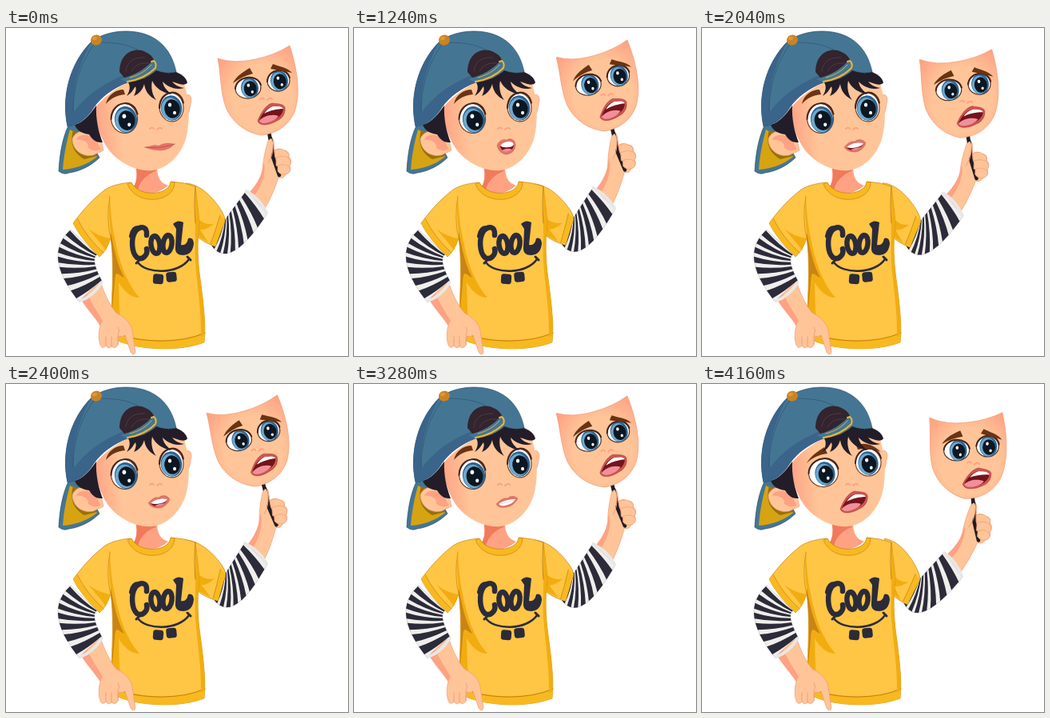
An HTML page that plays this animation: 428 by 410 pixels, repeating every 5.04 s.

```html
<!DOCTYPE html>
<html lang="en">
<head>
<meta charset="utf-8">
<title>Boy with a mask</title>
<style>
html, body { margin: 0; width: 100%; height: 100%; overflow: hidden; background: #fff; }
svg { display: block; width: 100%; height: 100%; }
</style>
</head>
<body>
<svg id="stage" viewBox="0 0 428 410"></svg>
<script>
const C = {
  skin: '#ffc598', shade: '#fea283', deep: '#f07a5c', skinLine: '#f19a78',
  cap: '#447694', capDark: '#3a648a', capLine: '#2c5068', trim: '#f2b62c',
  hair: '#231d29', brow: '#6a3413', ink: '#2b2b39',
  shirt: '#ffc544', fold: '#f1ad10', seam: '#c98414', hem: '#f8b91f',
  lip: '#e27468', lipDark: '#c2504b', throat: '#75131b', tongue: '#f0909a'
};

const fill = (d, color, extra = '') => `<path d="${d}" fill="${color}" ${extra}/>`;
const line = (d, color, w = 1) =>
  `<path d="${d}" fill="none" stroke="${color}" stroke-width="${w}" stroke-linecap="round" stroke-linejoin="round"/>`;
const shape = (d, color, edge, w = 0.7) => fill(d, color, `stroke="${edge}" stroke-width="${w}" stroke-linejoin="round"`);
const oval = (x, y, rx, ry, color, rot = 0, extra = '') =>
  `<ellipse cx="${x}" cy="${y}" rx="${rx}" ry="${ry}" fill="${color}" transform="rotate(${rot} ${x} ${y})" ${extra}/>`;
const group = (id, body) => `<g id="${id}">${body}</g>`;
const stop = (at, color) => `<stop offset="${at}" stop-color="${color}"/>`;

const defs = '<defs>' +
  `<radialGradient id="glow" cx="0.55" cy="0.58" r="0.66">${stop(0.55, C.skin)}${stop(1, C.shade)}</radialGradient>` +
  `<linearGradient id="cheek" x1="0" y1="0.55" x2="1" y2="0.45">${stop(0, C.shade)}${stop(0.28, C.skin)}</linearGradient></defs>`;

// Point on a quadratic curve given as [x0, y0, cx, cy, x1, y1]
const onQuad = (q, t) => [0, 1].map(i =>
  (1 - t) ** 2 * q[i] + 2 * t * (1 - t) * q[i + 2] + t * t * q[i + 4]);

// Striped sleeve between an outer and an inner curve; stripes sag by (sx, sy)
function sleeve(outer, inner, count, sx, sy) {
  const [a, b, c, d, e, f] = inner;
  let out = shape(`M${outer[0]},${outer[1]} Q${outer.slice(2)} L${e},${f} Q${c},${d} ${a},${b}Z`, '#f0eeec', '#c9c8cb');
  const sag = (u, v) => [(u[0] + v[0]) / 2 + sx, (u[1] + v[1]) / 2 + sy];
  for (let i = 0; i < count; i++) {
    const t0 = (i + 0.1) / count, t1 = (i + 0.7) / count;
    const [p, q, r, s] = [onQuad(outer, t0), onQuad(inner, t0), onQuad(inner, t1), onQuad(outer, t1)];
    out += fill(`M${p} Q${sag(p, q)} ${q} L${r} Q${sag(r, s)} ${s}Z`, C.ink);
  }
  return out;
}

function eye(x, y, rx, ry, iris, dx, dy, edge = '#7b4322') {
  const s = iris / 14;
  return oval(x, y, rx, ry, '#fff', -8, `stroke="${edge}" stroke-width="1.2"`) +
    oval(x + dx, y + dy, iris * 0.95, iris * 1.12, '#2c6390', -8) +
    oval(x + dx - s, y + dy + s, iris * 0.82, iris, '#6ba9d0', -8) +
    oval(x + dx + s, y + dy + s, iris * 0.7, iris * 0.84, '#0d1722', -8) +
    oval(x + dx - 2 * s, y + dy - 4 * s, 2.2 * s, 2.6 * s, '#fff') +
    oval(x + dx + 4 * s, y + dy + 6 * s, 2 * s, 2.2 * s, '#fff') +
    line(`M${x - rx},${y + 1} C${x - rx * 0.95},${y - ry * 1.15} ${x + rx * 0.7},${y - ry * 1.45} ${x + rx},${y - ry * 0.3}`, '#45241a', 2);
}

const scream = (x, y) => `<g transform="translate(${x} ${y})">` +
  shape('M-17,9 C-13,-1 -7,-11 1,-13 C5,-12 15,-13 17,-8 C18,0 14,6 7,9 C-3,15 -15,16 -17,9Z', '#cf5552', '#a83638', 0.6) +
  fill('M-15,8 C-11,-1 -5,-8 2,-9 C8,-9 13,-10 15,-6 C15,0 9,6 3,8 C-5,12 -13,12 -15,8Z', C.throat) +
  fill('M-9,0 C-5,-6 -1,-8 2,-9 C8,-9 13,-10 15,-6 C8,-6 -2,-4 -9,0Z', '#fff') +
  fill('M-15,9 C-10,3 1,0 9,3 C6,9 -12,16 -15,9Z', C.tongue) + '</g>';

const nose = (x, y) => line(`M${x - 7},${y + 1} Q${x - 4},${y - 2} ${x - 2},${y + 1} M${x + 2},${y + 2} Q${x + 6},${y - 2} ${x + 8},${y + 1}`, C.shade, 2);

const mask = shape('M265,38 Q286,45 312,39 Q336,34 355,22 C363,46 370,80 361,105 C353,123 338,132 320,134 C300,131 283,118 275,99 C268,79 269,57 265,38Z', 'url(#glow)', C.skinLine) +
  eye(303, 75, 16, 13, 11.5, 2, 0, '#54302a') + eye(341, 66, 14, 13, 11.5, 1, 0, '#54302a') +
  fill('M284,69 C288,60 298,54 305,50 L309,57 C300,59 292,63 284,69Z', C.brow) +
  fill('M331,51 L334,45 C341,48 352,49 358,56 C350,54 340,53 331,51Z', C.brow) +
  nose(325, 88) + scream(332, 107);

const fist = shape('M336,153 Q344,149 350,154 Q356,157 353,162 Q347,166 337,162Z', C.skin, C.skinLine) +
  shape('M338,162 Q350,158 355,164 Q358,169 354,173 Q345,176 338,172Z', C.skin, C.skinLine) +
  shape('M340,172 Q350,169 355,174 Q357,181 350,183 Q343,184 340,179Z', C.skin, C.skinLine);

const hand = shape('M303,208 C312,198 319,188 321,177 C322,163 325,151 328,141 Q332,133 335,141 L336,153 Q342,149 347,153 Q355,153 354,161 Q359,166 355,172 Q358,180 350,183 Q347,189 341,187 C337,199 331,214 323,227Z', C.skin, C.skinLine) +
  fill('M303,208 C312,198 319,188 321,177 L323,168 C326,181 320,199 308,213Z', C.shade) +
  line('M331,138 L334,161 L342,184', '#211d22', 4.6) + fist +
  fill('M325,157 C326,149 328,138 332,138 Q335,142 334,151 Q333,159 327,169Z', C.skin) +
  line('M334,145 Q335,159 328,169', C.skinLine, 0.9);

const arm = line('M329,130 L332,146', '#211d22', 4.6) + mask + hand +
  sleeve([256, 270, 278, 307, 327, 232], [273, 241, 275, 238, 301, 203], 7, 3, 1) +
  line('M301,204 Q318,214 326,231', '#e9e7e5', 4) +
  shape('M225,194 C243,195 260,212 270,229 Q274,235 274,241 Q268,257 262,273 Q248,269 236,258Z', C.shirt, C.seam) +
  fill('M274,240 Q268,257 262,273 L255,271 Q262,253 268,234Z', C.hem) +
  line('M268,234 Q262,254 256,270', C.seam, 0.7) +
  fill('M238,236 Q247,247 260,245 Q250,253 243,252 L253,268 L236,258Z', C.fold);

const brim = shape('M78,122 C70,139 67,160 66,179 Q72,184 79,181 C94,179 108,171 117,162 L108,146 L91,121Z', C.cap, C.capLine) +
  fill('M80,127 C75,145 72,162 71,177 C89,176 102,170 114,161 L105,140Z', '#d6a313') +
  fill('M84,127 C79,147 86,157 98,164 L114,160 L107,143Z', '#977108');

const ears = shape('M117,132 C104,124 86,128 83,139 C83,151 94,162 109,159 L122,153Z', C.skin, C.skinLine) +
  fill('M112,139 C101,131 90,133 88,140 C98,139 104,144 103,150 Q109,155 119,152Z', C.shade) +
  shape('M222,86 C229,80 234,85 231,95 C230,105 226,113 222,112Z', C.skin, C.skinLine);

const face = fill('M111,100 C126,82 146,70 165,62 L221,64 C230,88 231,117 225,139 C218,160 202,176 183,178 C160,180 137,165 127,150 C118,137 111,115 111,100Z', 'url(#cheek)');

const hat = fill('M86,121 C97,118 105,108 113,97 C112,113 116,131 121,143 C112,144 107,138 104,133 C96,132 89,129 86,121Z', C.hair) +
  shape('M77,123 C69,85 80,44 107,17 C124,4 151,1 172,7 C195,14 208,31 213,55 Q200,58 188,53 C178,61 165,66 152,68 C134,75 119,86 110,99 C102,112 92,121 77,123Z', C.cap, C.capLine) +
  fill('M77,123 C69,85 80,44 107,17 C90,48 82,78 85,105 C105,78 130,66 150,58 L152,68 C134,75 119,86 110,99 C102,112 92,121 77,123Z', C.capDark) +
  line('M112,18 C94,41 84,72 84,104 M114,18 C136,18 153,20 166,28', C.capLine, 0.6) +
  oval(113, 15, 7, 6.5, '#cb8322', -20) + oval(111, 13, 3, 2, '#dc9a3c', -20) +
  fill('M142,55 C142,34 156,25 170,28 C182,32 188,40 184,46 C175,56 160,60 148,62Z', '#33242e') +
  line('M150,54 C151,42 160,36 174,37 M157,54 C161,46 169,43 179,44', '#503845', 1);

const bangs = fill('M153,68 C168,66 180,60 188,53 Q200,58 213,55 Q225,60 227,68 Q225,72 217,70 L208,67 C212,72 217,74 223,75 C211,78 202,73 196,67 C197,75 203,79 207,83 C196,81 187,75 183,66 C181,74 183,84 188,90 C178,85 174,78 173,70 C171,77 167,82 160,85 C163,79 163,76 162,73 C158,79 156,82 151,85 C155,79 156,73 153,68Z', C.hair) +
  fill('M143,64 C161,59 175,51 183,41 L187,42 L187,51 C177,60 165,66 152,68Z', C.cap) +
  line('M152,67 C165,65 178,59 187,50 Q189,44 185,41 L182,42', C.trim, 2) +
  line('M155,62 C167,59 176,53 182,46', C.trim, 0.9);

const calmEyes = eye(148, 113, 16.5, 18.5, 14.8, 2, 1.5) + eye(207, 99, 15, 18, 14, 0, 1) +
  fill('M125,95 C127,84 137,77 147,77 L149,83 C139,84 132,87 125,95Z', C.brow);

const scaredEyes = eye(152, 111, 18.5, 17.5, 13.2, 2, 1) + eye(208, 98, 16, 17, 13.2, 0, 1) +
  fill('M131,99 C136,90 145,84 153,79 L157,87 C147,88 138,92 131,99Z', C.brow) +
  fill('M193,77 C203,72 215,76 224,85 C214,80 205,80 195,82Z', C.brow) +
  scream(190, 147);

const mouths = {
  closed: fill('M174,149 C182,147 186,145 191,147 C198,143 204,143 211,145 C206,151 198,154 191,153 C184,153 178,151 174,149Z', C.lip) +
    line('M174,149 C186,150 197,150 211,145', C.lipDark, 0.9),
  teeth: shape('M178,150 C184,144 188,142 192,143 C197,139 201,140 205,143 C202,149 197,153 190,154 C185,155 180,154 178,150Z', C.lip, C.lipDark, 0.4) +
    fill('M181,150 C186,146 194,144 202,144 C199,149 194,151 189,152 Q183,153 181,150Z', '#fff') +
    line('M182,150 Q193,149 201,145', '#d9c8c8', 0.6),
  round: shape('M179,147 C181,141 187,138 191,140 C197,136 202,141 202,146 C202,153 197,158 190,158 C184,157 180,152 179,147Z', C.lip, C.lipDark, 0.4) +
    fill('M183,147 C186,142 197,139 200,145 C200,151 196,155 190,155 C186,154 183,151 183,147Z', C.throat) +
    fill('M183,147 C186,142 197,139 200,145 Q199,149 193,149 Q186,150 183,147Z', '#fff') +
    fill('M185,153 Q192,149 198,152 Q195,155 190,155 Q187,155 185,153Z', C.tongue),
  open: shape('M178,149 C183,143 187,141 191,142 C196,138 202,139 205,144 C203,150 197,155 191,155 C185,155 181,153 178,149Z', C.lip, C.lipDark, 0.4) +
    fill('M181,149 C186,144 196,142 202,144 C200,149 195,152 190,153 C185,153 182,151 181,149Z', C.throat) +
    fill('M181,149 C186,144 196,142 202,144 Q200,148 194,149 Q187,151 181,149Z', '#fff') +
    fill('M186,152 Q193,149 199,149 Q194,153 189,153Z', C.tongue)
};

const leftSleeve = sleeve([81, 252, 44, 284, 92, 343], [114, 283, 105, 289, 121, 318], 7, -1, 3);

const leftHand = shape('M94,339 C102,352 112,362 118,372 C115,382 116,393 119,398 Q122,401 125,397 Q128,402 132,398 Q137,402 140,396 L141,385 Q146,387 149,384 L156,405 Q160,411 162,405 L158,379 C156,367 147,361 138,356 C129,346 123,331 118,317Z', C.skin, C.skinLine) +
  fill('M94,339 C102,352 112,362 118,372 L121,366 C115,355 107,345 102,332Z', C.shade) +
  line('M125,397 L125,386 M132,398 L132,386 M140,396 L140,383 Q143,378 140,374', C.skinLine, 0.9) +
  line('M93,341 Q109,335 119,319', '#e9e7e5', 4);

const neck = fill('M162,168 C164,180 164,190 160,198 Q180,216 203,197 C192,193 189,186 189,172Z', C.shade) +
  fill('M162,172 C165,184 164,192 160,198 L165,202 C168,191 176,183 187,179 L189,174Z', C.deep);

const shirt = shape('M156,193 C146,194 133,196 124,202 C108,214 95,229 84,244 Q94,264 117,286 Q126,278 131,263 C135,286 133,330 132,350 L131,384 C140,398 205,409 248,393 C251,368 245,330 242,306 C239,281 240,260 242,242 L237,198 Q224,193 207,192 C206,207 172,216 156,193Z', C.shirt, C.seam) +
  fill('M130,210 C127,244 133,262 134,282 C136,310 131,336 131,384 Q137,391 147,394 C141,365 142,340 141,318 C148,330 157,337 167,337 C150,318 141,290 136,262 C132,245 131,228 130,210Z', C.fold) +
  fill('M131,255 C135,275 139,296 148,312 C140,309 137,300 136,318 L132,362 C134,320 135,290 131,263Z', C.seam) +
  fill('M84,244 Q94,264 117,286 L122,281 Q101,262 89,238Z', C.hem) +
  line('M89,238 Q101,262 122,281 M130,210 Q125,239 131,263', C.seam, 0.7) +
  fill('M131,384 C140,398 205,409 248,393 L249,381 C215,396 155,394 131,376Z', C.hem) +
  line('M131,376 C155,394 215,396 249,381', C.seam, 1.2) +
  fill('M131,263 Q116,261 103,251 Q118,268 125,278Z', C.fold) +
  fill('M237,198 L242,242 C240,260 239,281 242,306 C245,330 251,368 248,384 L244,386 C245,340 234,300 237,262Z', C.fold) +
  line('M237,198 Q235,222 237,244', C.seam, 1) +
  shape('M157,193 C166,212 204,210 206,192 L211,193 C211,219 162,223 152,195Z', C.hem, C.seam);

const ring = (x, y, rot) => oval(x, y, 5.5, 11, 'none', rot, `stroke="${C.ink}" stroke-width="6.5"`);
const tooth = (x, y, rot) =>
  `<rect x="${x}" y="${y}" width="13" height="12.5" rx="3.5" fill="${C.ink}" transform="rotate(${rot} ${x + 6} ${y + 6})"/>`;
const lettering = line('M176,259 C177,247 168,247 162,254 C156,263 157,281 164,287 C171,291 178,283 176,276', C.ink, 6.5) +
  line('M157,260 Q159,250 165,250', C.ink, 6) +
  ring(187, 271, -8) + ring(202, 270, 8) +
  fill('M209,245 Q215,239 222,243 L219,271 Q226,273 228,263 Q234,261 235,269 Q234,283 222,284 Q211,284 212,274 L213,251Z', C.ink) +
  line('M165,293 C176,308 216,308 229,289', C.ink, 2.5) +
  line('M163,294 L167,290 M227,286 L231,290', C.ink, 3) +
  tooth(184, 307.5, 4) + tooth(200.5, 305, -6);

const stage = document.getElementById('stage');
stage.innerHTML = defs + group('arm', arm) + leftSleeve + neck + shirt + lettering + leftHand +
  brim + ears + face + hat + nose(187, 125) +
  group('calm', calmEyes) + group('scared', scaredEyes) +
  Object.keys(mouths).map(k => group(k, mouths[k])).join('') + bangs;

const LOOP = 5040, STEP = 40, FIRST = 5, LAST = 104, SCARE = 97;
const SWING = [[2, 6], [5, 0], [12, -7.4], [19, 6]]; // step in the cycle, degrees
const CYCLE = 17;
const TALK = ['teeth', 'round', 'open'];
const part = id => document.getElementById(id);
const show = (id, on) => part(id).setAttribute('visibility', on ? 'visible' : 'hidden');

function swing(n) {
  const p = (n + CYCLE - 2) % CYCLE + 2;
  const i = SWING.findIndex(([at], k) => k && p <= at);
  const [[a, from], [b, to]] = [SWING[i - 1], SWING[i]];
  return from + (to - from) * (p - a) / (b - a);
}

function update(ms) {
  const n = Math.min(LAST, Math.max(FIRST, Math.floor(ms % LOOP / STEP)));
  const scared = n >= SCARE;
  const mouth = n === FIRST ? 'closed' : TALK[Math.floor(n / 3) % TALK.length];
  part('arm').setAttribute('transform', `rotate(${swing(n).toFixed(2)} 235 228)`);
  show('calm', !scared);
  show('scared', scared);
  for (const k in mouths) show(k, !scared && k === mouth);
}

const start = performance.now();
function tick() {
  update(performance.now() - start);
  requestAnimationFrame(tick);
}
tick();
</script>
</body>
</html>
```
